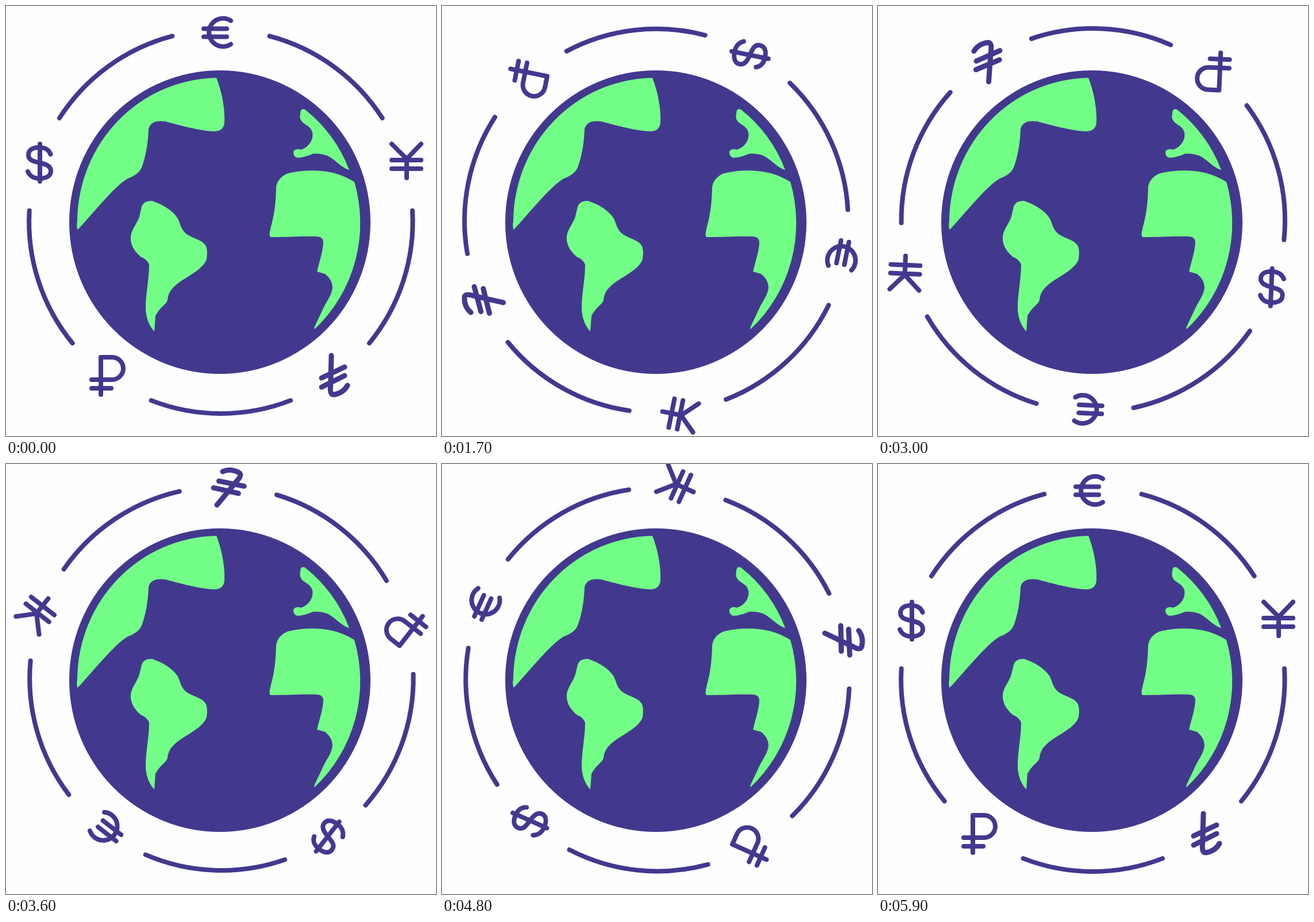
An HTML page with a canvas for the animation above (6000 ms loop, 748 px wide and 748 px high).

```html
<!DOCTYPE html>
<html lang="en">
<head>
<meta charset="utf-8">
<title>World currencies</title>
<style>
  html, body { margin: 0; width: 100%; height: 100%; overflow: hidden; background: #fefdff; }
  canvas { display: block; }
</style>
</head>
<body>
<canvas id="stage" width="748" height="748"></canvas>
<script>
const ctx = document.getElementById('stage').getContext('2d');
const PAPER = '#fefdff', INK = '#42398f', LAND = '#73ff87';
const PIVOT = { x: 374, y: 374 };
const RING = { x: 373.8, y: 375.2, r: 333.7 };
const LOOP = 6000, HOLD = 100, STEPS = 71;
const rad = deg => deg * Math.PI / 180;

const land = [
  // North America
  `M366 125 C376 150 381 180 380 202 Q379 217 364 218 C340 218 300 207 278 201
   Q252 197 248 214 C247 240 243 262 236 281 Q231 293 212 300
   C190 312 150 362 125 389 Q122 385 124 374 A246 251 0 0 1 366 125Z`,
  // South America
  `M236 349 Q240 338 254 339 C272 345 290 355 299 370 C304 380 304 390 316 398
   C330 406 342 407 348 418 Q351 425 349 440 C344 458 315 470 297 484
   C285 494 282 502 281 511 C279 520 270 521 260 539 L258 566
   C248 556 243 540 243 525 C243 500 249 475 249 450 Q246 441 234 436
   C222 425 216 415 217 400 C220 385 231 375 233 362Z`,
  // Europe
  `M512 187 Q512 177 520 180 A243 248 0 0 1 597 285
   C585 283 572 266 558 260 Q545 256 534 257 C525 261 515 264 507 264
   Q499 262 500 253 Q504 247 513 250 C528 245 535 232 533 220
   C530 208 520 208 514 200 Q510 195 512 187Z`,
  // Africa
  `M470 315 Q472 300 488 292 C515 284 550 285 572 291 Q590 296 606 306
   A246 251 0 0 1 537 562 C534 561 542 548 550 530
   C558 512 566 505 568 490 Q568 476 555 466 L541 462 C545 445 551 428 552 412
   Q552 401 540 401 C515 400 490 402 460 402 Q457 400 460 388
   C466 365 469 350 470 315Z`
].map(d => new Path2D(d));

const signs = [
  // euro
  ['M391 25.5 A24.5 24.5 0 1 0 391 66.5 M344 39.5 H384 M344 53.5 H384', 8],
  // yen
  ['M671 240 L697 266 L722 240 M697 266 V299 M671 268 H722 M671 283 H722', 8],
  // lira
  ['M566 608 L564.5 662 Q563 677 571 676 Q587 673 594 660 M549 647 L589 628 M549 663 L589 643', 9],
  // ruble
  ['M165 676 V611 H184.5 A19.5 19.5 0 0 1 184.5 650 H149 M149 665 H183', 8],
  // dollar
  [`M77.5 258 C75 250 67 246 58 246 C47 246 39 250 39 259 C39 269 49 270.5 58 272.5
    C69 275 78 278 78 287 C78 296 69 300 58 300 C48 300 41 295 38 288 M59 240 V305`, 8]
].map(([d, width]) => [new Path2D(d), width]);

function drawGlobe() {
  ctx.fillStyle = INK;
  ctx.beginPath();
  ctx.ellipse(372, 376, 262, 264, 0, 0, Math.PI * 2);
  ctx.fill();
  ctx.fillStyle = LAND;
  land.forEach(shape => ctx.fill(shape));
}

function drawRing(angle) {
  ctx.save();
  ctx.translate(PIVOT.x, PIVOT.y);
  ctx.rotate(angle);
  ctx.translate(-PIVOT.x, -PIVOT.y);
  ctx.strokeStyle = INK;
  ctx.lineCap = ctx.lineJoin = 'round';
  ctx.lineWidth = 8;
  for (let i = 0; i < 5; i++) {
    const mid = 90 + 72 * i;
    ctx.beginPath();
    ctx.arc(RING.x, RING.y, RING.r, rad(mid - 21.3), rad(mid + 21.3));
    ctx.stroke();
  }
  for (const [path, width] of signs) {
    ctx.lineWidth = width;
    ctx.stroke(path);
  }
  ctx.restore();
}

function draw(now) {
  const tick = Math.floor((now % LOOP) / HOLD);
  // 72 poses over the loop, shown at 10 per second
  const step = Math.round(tick * 1.2);
  ctx.fillStyle = PAPER;
  ctx.fillRect(0, 0, 748, 748);
  drawGlobe();
  drawRing(rad(step * 360 / STEPS));
}

function frame() {
  draw(performance.now());
  requestAnimationFrame(frame);
}
frame();
</script>
</body>
</html>
```
